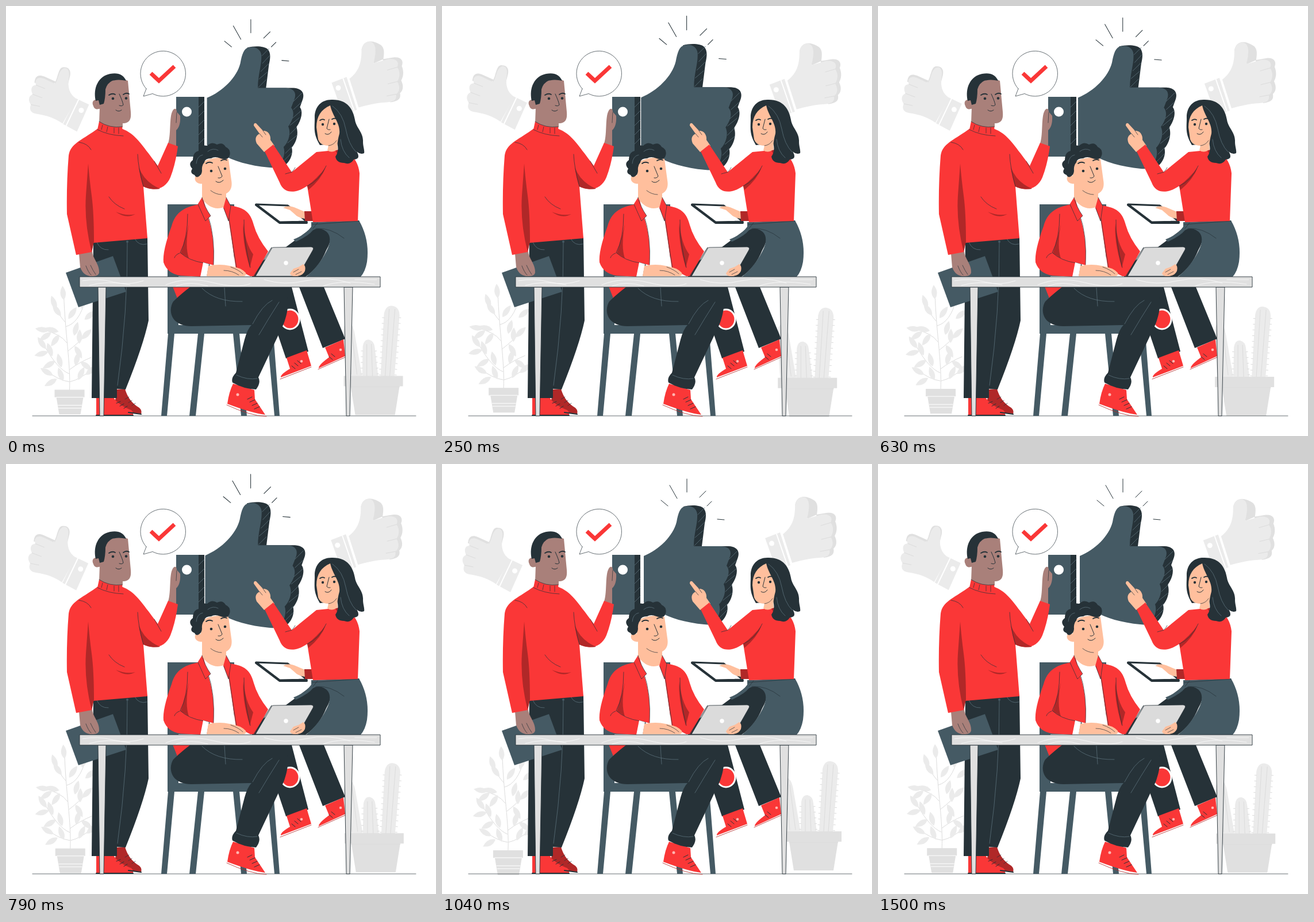
An HTML page that plays this animation: 748x748 px, repeating every 1.54 s.

```html
<!DOCTYPE html>
<html lang="en">
<head>
<meta charset="utf-8">
<title>Team thumbs up</title>
<style>
html,body{margin:0;height:100%;overflow:hidden;background:#fff}
svg{display:block;width:100vw;height:100vh}
.red{fill:#fa3737}.deep{fill:#b02828}.dark{fill:#263238}.slate{fill:#455a64}
.skin{fill:#ffbf9d}.brown{fill:#a9807a}.white{fill:#fff}
.pale{fill:#ebebeb}.grey{fill:#e0e0e0}
.line,.soft,.faint,.rib{fill:none;stroke-linecap:round;stroke-linejoin:round}
.line{stroke:#263238;stroke-width:1}
.soft{stroke:#5b707a;stroke-width:.8}
.faint{stroke:#fff;stroke-width:1}
.rib{stroke:#dcdcdc;stroke-width:1}
.thin{stroke-width:.7}.brow{stroke-width:1.8}.bold{stroke-width:2}.edge{stroke-width:4}
.seam{stroke:#b02828;stroke-width:.8}
.spines{stroke-width:4;stroke-linecap:butt;stroke-dasharray:1 9}
</style>
</head>
<body>
<svg viewBox="0 0 748 748">
<!-- floating background -->
<g id="thumbL">
  <path class="grey" d="M88 126C92 112 94 106 101 107C109 107 113 113 111 122L107 138L84 136ZM49 134C50 122 56 119 66 123L86 132L82 137Z"/>
  <path class="pale" d="M122 162C110 154 106 142 109 124C111 110 104 106 98 110C90 116 91 127 85 136L66 127C55 122 48 129 52 138C43 138 42 147 46 154C38 157 38 166 43 172C39 180 43 187 52 188C72 191 85 196 98 205Z"/>
  <path class="rib" d="M52 138L67 144M46 154L62 160M43 172L58 175"/>
  <path class="pale" d="M121 161L144 172L123 219L99 206Z"/>
  <path class="faint bold" d="M126 163L104 209"/>
  <circle class="white" cx="130.500" cy="182" r="4.500"/>
</g>
<g id="thumbR">
  <path class="grey" d="M618 76C620 62 631 58 643 63C656 68 659 73 656 92L640 99ZM655 92L673 89C687 87 692 95 688 104C692 113 691 122 687 129C692 139 690 147 685 151C687 161 682 165 668 167Z"/>
  <path class="pale" d="M597 126C613 114 618 98 618 78C619 65 627 60 635 62C645 66 643 83 639 99L664 92C680 90 684 98 680 106C686 113 685 125 680 131C686 140 684 149 678 153C680 163 674 166 662 167C642 168 628 172 613 176Z"/>
  <path class="rib" d="M680 106L663 111M680 131L664 135M678 153L662 156"/>
  <path class="pale" d="M566 133L592 123L610 180L586 189Z"/>
  <path class="faint bold" d="M586 126L605 181"/>
  <circle class="white" cx="577.500" cy="142" r="4.500"/>
</g>
<g id="plant">
  <path class="rib" d="M111 669C113 620 103 570 101 502M110 640Q90 632 68 593M110 654Q92 652 66 632M106 586Q95 570 62 563M103 550Q94 540 84 522M105 558Q128 552 138 512M109 600Q125 588 144 568M111 633Q128 620 148 612M112 654Q130 650 150 632"/>
  <g id="leaves" class="pale"></g>
  <path class="grey" d="M85 668H137V681H135L130 711H93L88 681H85Z"/>
  <path class="faint" d="M88 681H135M91 695H132M92 700H131"/>
</g>
<g id="cactus">
  <path class="pale" d="M652 644L658 535Q661 520 672 521Q685 523 685 538L676 644ZM620 644L621 592Q623 579 632 580Q641 582 642 594L648 644ZM592 644L587 570Q588 548 597 550Q605 553 608 575L620 644Z"/>
  <path class="rib" d="M660 644L667 527M668 644L677 527M628 644L628 588M638 644L636 588M601 640L594 558M611 640L601 562"/>
  <path class="rib spines" d="M651 642L657 536M678 642L686 538M619 640L620 594M647 640L643 594"/>
  <path class="grey" d="M588 643H691V661H685L677 711H608L600 661H588Z"/>
  <path class="rib" d="M600 662H685"/>
</g>
<path class="line thin" d="M46 713H713"/>

<!-- speech bubble -->
<path class="white" d="M245 144L239 157L256 152Z"/>
<path class="line thin" d="M244 144A39.300 39.300 0 1 1 255 152.500L239 157L244 144"/>
<path d="M252 117L266 130L293 105" fill="none" stroke="#fa3737" stroke-width="7"/>

<!-- large thumb -->
<path class="slate" d="M296 158H336V262H296Z"/>
<path class="dark" d="M335 158H345V246L335 262Z"/>
<path class="soft" d="M335 176L345 166M335 192L345 182M335 208L345 198M335 224L345 214M335 240L345 230"/>
<circle class="white" cx="314.500" cy="184" r="8.500"/>
<g id="pulse">
  <path class="dark" d="M420 74C432 71 449 71 455 77C461 84 459 94 457 103L452 143H499C513 144 518 151 515 162L510 176C516 184 512 199 504 210C508 221 504 236 496 245C499 257 492 271 483 276C476 279 468 279 461 278L430 180Z"/>
  <path class="slate" d="M351 160C378 149 402 125 408 101C411 85 414 76 422 74C432 71 443 76 444 87C445 104 438 120 438 143H486C500 144 504 151 501 161L495 177C502 185 498 198 490 209C495 220 491 235 482 244C486 256 480 268 475 276C470 279 464 280 456 279C424 276 396 268 376 256Q362 246 351 241Z"/>
  <path class="soft" d="M445 88L457 76M446 101L458 88M443 115L456 102M440 128L454 116M439 142L452 129M499 166L513 152M499 180L512 168M497 195L512 182M493 207L509 194M493 222L505 210M489 237L505 224M485 255L497 243M482 268L496 254"/>
  <path class="line" d="M426 26V49M396 37L409 60M381 63L393 73M459 47L448 58M469 65L461 73M479 96L491 97"/>
</g>

<!-- standing man -->
<path class="brown" d="M281 242C288 226 283 194 290 182C293 177 297 178 297 184L303 191C304 205 300 213 296 216V246Z"/>
<path class="line thin" d="M297 185L296 203"/>
<path class="deep" d="M193 667L207 666Q213 688 232 699Q237 704 235 709L212 708Q202 698 189 692Z"/>
<path class="line thin" d="M207 684l7-4M213 690l6-4M219 695l6-4"/>
<path class="red" d="M157 682L187 681Q195 694 218 703Q222 707 221 711H157Z"/>
<path class="line bold" d="M157 712H221M213 707L235 710"/>
<path class="line" d="M192 691l7-3M198 696l7-4M205 700l6-4"/>
<path class="dark" d="M152 408L246 402L248 547Q239 590 208 667L193 666V682H149Z"/>
<path class="soft" d="M211 412Q212 530 194 660M158 411Q164 425 178 424M224 405Q231 418 245 414"/>
<circle cx="211" cy="410" r="2" class="slate"/>
<path class="slate" d="M104 464L186 435L209 497L126 524Z"/>
<path class="brown" d="M127 431L150 427C151 440 163 449 162 464C160 471 152 470 146 470C137 468 132 463 129 454Z"/>
<path class="line thin" d="M139 452Q143 463 148 468M147 451Q151 460 156 467"/>
<path class="red" d="M203 214C225 223 234 238 264 278L282 238L299 244Q295 275 286 298C278 317 260 324 239 314L246 404L152 412L149 428L122 433L106 362Q105 310 109 260C112 239 133 233 160 213Z"/>
<path class="deep" d="M143 274Q145 300 149 330T153 410L149 428Q136 377 139 330ZM231 280Q240 306 268 318Q250 320 239 314Q234 300 231 280ZM191 358Q209 366 225 362Q209 371 191 358Z"/>
<path class="line thin" d="M127 237Q142 239 148 250M179 332Q188 346 206 353M229 258Q230 282 239 314M258 270L270 291"/>
<path class="brown" d="M164 150L162 204Q180 218 203 211V204C216 204 218 196 217 184L212 130Q198 124 172 134ZM164 164C153 160 148 166 152 174C154 181 160 180 165 178Z"/>
<path class="dark" d="M156 165C151 142 161 122 181 118Q202 114 209 130Q196 127 185 130Q176 134 173 145Q173 160 170 170L163 172L161 164Z"/>
<path class="line brow" d="M179 155Q185 151 190 154M204 154Q209 150 214 153"/>
<path class="line" d="M197 153Q203 166 204 172Q202 175 197 173M191 181Q196 185 201 181"/>
<g class="dark"><circle cx="186" cy="161" r="2.300"/><circle cx="209" cy="160.500" r="2.300"/></g>
<path class="red" d="M162 201Q180 213 202 210L204 226Q178 225 159 215Z"/>
<path class="line thin" d="M162 201Q180 213 202 210M159 215Q178 225 204 226M168 207l-2 8M177 210l-2 9M188 212v9M196 212v10"/>

<!-- chair -->
<path class="slate" d="M281 345H397V470H300V555H476V570H281ZM282 570H293L280 713H270ZM334 570H345L330 713H319ZM395 570H406L419 713H409ZM454 570H465L476 713H467Z"/>

<!-- seated woman -->
<path class="dark" d="M428 454L486 420Q512 401 533 385L562 384Q570 403 557 425Q545 455 521 471H428ZM470 489H497L526 601L487 613L464 545ZM510 489H553L590 579L551 595Z"/>
<path class="slate" d="M531 376L614 373Q633 406 628 445Q625 462 617 471H522Q547 450 560 421Q570 395 549 388Q540 386 534 390Q526 400 504 410L500 406Q521 398 531 384Z"/>
<path class="line thin" d="M533 380Q559 378 614 374M539 387Q564 385 588 404M542 377l-8 10"/>
<path class="red" d="M488 612L523 599L531 626L478 646Q477 641 494 631ZM555 594L587 580L590 609L544 630Q543 625 562 611Z"/>
<path class="line seam" d="M477 649L531 628M543 632L590 611"/>
<path class="line" d="M497 626l6 5M502 621l6 5M507 617l6 5M562 610l6 5M566 605l6 5"/>
<g fill="#ffb5b0"><circle cx="514" cy="618" r="2.300"/><circle cx="582" cy="598" r="2.300"/></g>
<path class="white" d="M435 345L490 347L523 375L476 376Z" stroke="#263238" stroke-width="3" stroke-linejoin="round"/>
<path class="line edge" d="M435 346L476 377L523 377"/>
<path class="skin" d="M482 351Q490 346 501 350L520 358V370Q508 369 501 361L494 355Z"/>
<path class="deep" d="M519 357H537V374H520Z"/>
<path class="skin" d="M449 254L436 239C432 229 436 225 441 222L431 208Q431 203 435 204L447 217C456 216 461 225 460 233L467 243Z"/>
<path class="line thin" d="M441 222L446 228M447 217l5 7"/>
<path class="red" d="M540 254L581 250C603 255 613 272 615 291L612 374L534 376L524 313C504 327 483 327 476 307L450 253L465 241L497 289Z"/>
<path class="deep" d="M524 313Q541 300 556 281Q548 302 526 320ZM573 251Q586 279 608 266Q592 274 581 250Z"/>
<path class="line thin" d="M524 313Q545 304 557 278M486 292L497 289Q501 285 503 281"/>
<path class="dark" d="M546 242C534 222 537 212 537 196C536 176 548 163 566 163C594 162 604 180 607 198C609 212 622 220 621 236C621 245 624 250 623 256Q616 259 610 253Q618 266 605 267Q599 277 588 273Q575 273 573 262Q580 252 576 239Z"/>
<path class="skin" d="M564 173C548 180 540 192 540 211L543 232Q547 243 561 243L559 251Q567 257 577 249Q575 240 580 222C582 204 568 192 564 173Z"/>
<path class="line brow" d="M546 199Q550 196 554 198M567 197Q572 194 576 197"/>
<path class="line" d="M562 197L558 213Q560 216 564 215M555 222Q561 226 566 219"/>
<path class="line thin" d="M561 243Q570 242 575 234"/>
<g class="dark"><circle cx="551" cy="206" r="2.200"/><circle cx="571" cy="205" r="2.200"/></g>
<path class="soft" d="M568 174Q586 187 591 214T609 254M582 232Q584 253 597 264"/>

<!-- seated man -->
<ellipse class="red" cx="494" cy="545" rx="16" ry="17" stroke="#fff" stroke-width="3"/>
<path class="red" d="M290 488H322L299 511ZM395 657L432 668L433 684L451 711Q427 708 385 692Q388 671 395 657Z"/>
<path class="line seam" d="M384 694Q425 713 453 714"/>
<path class="line" d="M420 684l8-4M424 689l9-4M428 695l9-4M432 701l9-4"/>
<circle cx="403" cy="676" r="2.500" fill="#ffb5b0"/>
<path class="dark" d="M320 489H480C494 501 493 526 483 553L439 646Q444 655 435 667Q413 666 394 655Q391 647 400 638L415 580Q420 562 427 555L322 557C285 556 282 528 291 514Q302 503 320 489Z"/>
<path class="soft" d="M341 491Q365 515 411 514M380 490L382 522M475 515Q457 543 440 572M401 642Q420 651 437 648M463 512Q446 520 429 553"/>
<path class="white" d="M346 345H385L401 470H356Z"/>
<path class="red" d="M343 334L336 345C307 350 294 361 288 383Q272 426 274 446Q281 466 304 469L340 471L344 446L361 451Q364 401 350 363ZM383 335L390 347C415 351 425 358 431 381Q437 403 456 427L432 470H425L400 457L385 356Z"/>
<path class="deep" d="M318 380Q311 418 318 439L304 430Q311 408 318 380ZM413 378Q416 413 430 432L424 455Q410 407 413 378Z"/>
<path class="line thin" d="M316 362Q316 405 303 429Q318 443 344 447M414 372Q413 408 425 455M385 351L401 457M351 363Q364 400 361 450M302 430Q295 432 293 438"/>
<path class="skin" d="M341 300V335Q359 360 383 348V320Z"/>
<path class="red" d="M341 333Q345 349 356 365L347 374Q335 361 334 344ZM383 333L391 348L387 374L378 351Z"/>
<path class="line thin" d="M341 333Q345 349 356 365L347 374L334 345M383 333L391 348L387 374L379 352"/>
<path class="skin" d="M337 275Q360 259 387 266L392 303C395 319 387 328 374 328C355 328 347 317 343 309C331 311 325 301 331 295Q335 292 339 296Z"/>
<path class="dark" d="M336 296Q331 300 328 294Q319 291 324 283Q316 274 325 268Q325 254 335 252Q337 240 350 243Q358 235 367 241Q377 236 382 245Q392 250 389 260Q386 270 373 265Q363 261 357 265Q346 265 345 272Q340 278 341 286Q341 293 336 296Z"/>
<path class="soft" d="M331 274Q332 261 342 259M351 253Q360 246 369 251"/>
<path class="line brow" d="M348 274Q353 270 359 273M374 269Q379 266 384 268"/>
<path class="line" d="M369 279L376 296Q374 300 369 299M365 305Q371 310 378 303"/>
<path class="line thin" d="M356 321Q365 328 375 328"/>
<g class="dark"><circle cx="357" cy="287" r="2.300"/><circle cx="381" cy="283" r="2.300"/></g>
<path class="white" d="M343 446L353 449L349 471H338Z"/>
<path class="skin" d="M352 452Q372 448 389 452Q409 455 417 464Q419 470 412 470H349Z"/>
<path class="line thin" d="M379 460Q393 460 405 468M391 454Q405 459 412 466"/>

<!-- laptop and table -->
<path d="M465 420L531 419Q537 420 533 426L508 470H434L461 424Q462 420 465 420Z" fill="#dbdbdb" stroke="#263238" stroke-width=".8"/>
<path class="line" d="M462 420L431 470"/>
<circle class="white" cx="487" cy="447" r="3.700"/>
<path class="skin" d="M494 465L500 457L509 454L517 449Q522 452 520 461Q516 470 503 470Q495 470 494 465Z"/>
<path class="line thin" d="M500 463l9-5M504 467l10-5"/>
<g fill="#e0e0e0" stroke="#263238" stroke-width=".9">
  <path d="M160 489H174L170 713H163ZM588 489H603L598 713H592Z"/>
  <path d="M128 471H651V489H128Z"/>
</g>
<path class="faint thin" d="M133 478Q160 473 186 480T239 478M145 486Q176 477 216 485M278 485Q315 470 359 481T425 483M296 487Q320 478 351 487M449 476Q484 487 521 478T599 482M552 487Q584 475 641 484M607 476H645"/>
</svg>
<script>
const get = id => document.getElementById(id);
const LOOP = 1540, LEAD = 25, DRIFT = 4.2;

// x, y of each leaf's base and its heading in degrees
const leaves = [
  [101,512,-95], [96,540,-125], [88,528,-110], [109,545,-55], [131,527,-68], [137,546,-38],
  [92,567,-165], [76,565,-172], [79,568,145], [93,572,125], [119,574,-75], [132,580,-45],
  [81,610,-110], [70,597,-125], [74,602,165], [86,618,150], [97,629,-105], [120,592,60],
  [128,588,-88], [82,643,-150], [89,649,150], [100,653,-110], [121,626,-75], [130,619,38],
  [126,651,-65], [139,642,-38]
];
get('leaves').innerHTML = leaves.map(([x, y, a]) =>
  `<path transform="translate(${x} ${y}) rotate(${a})" d="M0 0Q11-10 25 0Q11 9 0 0"/>`).join('');

const drifts = { thumbL: [1, -1], thumbR: [1, 1], plant: [-1, -1], cactus: [-1, 1] };

// Two beats (a slow fall, then a sharp one) followed by a rest
function beat(t) {
  if (t < 150) return t / 150;
  if (t < 450) return (450 - t) / 300;
  return Math.max(0, 1 - Math.abs(t - 750) / 150);
}

function draw() {
  const t = (performance.now() + LEAD) % LOOP;
  const d = DRIFT * Math.sin(2 * Math.PI * t / LOOP);
  for (const id in drifts) {
    const [x, y] = drifts[id];
    get(id).setAttribute('transform', `translate(${x * d} ${y * d})`);
  }
  get('pulse').setAttribute('transform',
    `translate(433 175) scale(${1 + .1 * beat(t)}) translate(-433 -175)`);
  requestAnimationFrame(draw);
}
draw();
</script>
</body>
</html>
```
